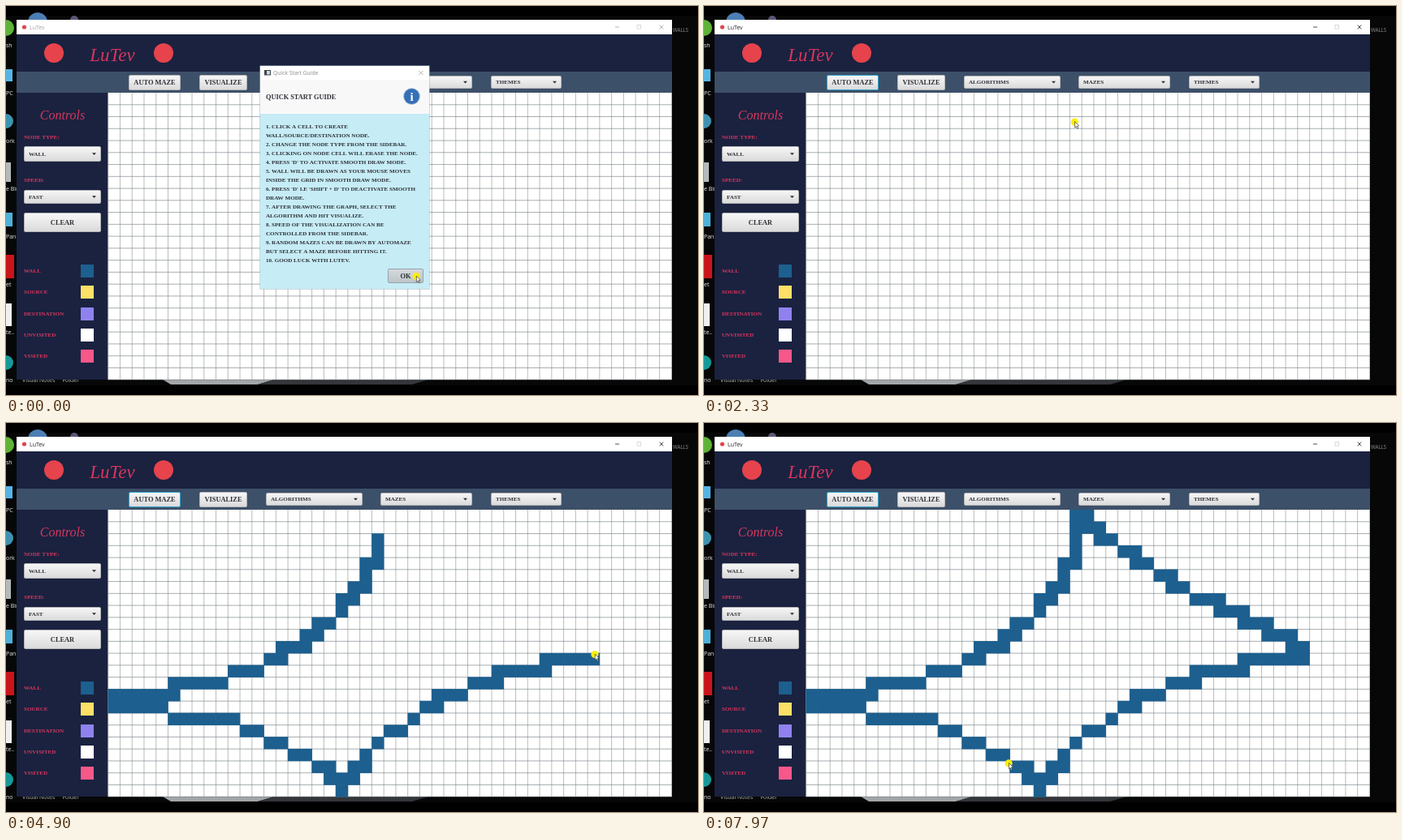
Animation, 852 px wide and 480 px high, one loop 8000 ms. Source, as an HTML page with a canvas:

```html
<!DOCTYPE html>
<html lang="en">
<head>
<meta charset="utf-8">
<title>Path finder</title>
<style>
html, body { margin: 0; width: 100%; height: 100%; overflow: hidden; background: #000; }
canvas { display: block; width: 852px; height: 480px; }
</style>
</head>
<body>
<canvas id="stage" width="852" height="480"></canvas>
<script>
const W = 852, H = 480, LOOP = 8000;
const GX = 125.7, GY = 107, CELL = 14.76, COLS = 47, ROWS = 24;
const SERIF = '"Liberation Serif", "Noto Serif", serif';
const SANS = '"Open Sans", "Noto Sans", sans-serif';
const NAVY = '#1a2240', WALL = '#1d5f8e', PINK = '#d8365c', LOGO = '#e6434c', INK = '#2e3036';

const view = document.getElementById('stage').getContext('2d');
let g = view;

function box(x, y, w, h, fill) {
  g.fillStyle = fill;
  g.fillRect(x, y, w, h);
}

function disc(x, y, r, fill) {
  g.fillStyle = fill;
  g.beginPath();
  g.arc(x, y, r, 0, Math.PI * 2);
  g.fill();
}

function shape(points, fill) {
  g.fillStyle = fill;
  g.beginPath();
  points.forEach(([x, y]) => g.lineTo(x, y));
  g.closePath();
  g.fill();
}

function line(x1, y1, x2, y2, color, width = 0.8) {
  g.strokeStyle = color;
  g.lineWidth = width;
  g.beginPath();
  g.moveTo(x1, y1);
  g.lineTo(x2, y2);
  g.stroke();
}

function text(str, x, y, font, color, align = 'left') {
  g.font = font;
  g.fillStyle = color;
  g.textAlign = align;
  g.fillText(str, x, y);
}

// Bold capitals, centred vertically on y
function caps(str, x, y, size, color = INK, align = 'left') {
  text(str, x, y + size * 0.33, `bold ${size}px ${SERIF}`, color, align);
}

function panel(x, y, w, h, border = '#b4b4b6', top = '#f8f8f8', low = '#d9d9da') {
  const grad = g.createLinearGradient(0, y, 0, y + h);
  grad.addColorStop(0, top);
  grad.addColorStop(1, low);
  g.beginPath();
  g.roundRect(x + 0.5, y + 0.5, w - 1, h - 1, 1.5);
  g.fillStyle = grad;
  g.fill();
  g.strokeStyle = border;
  g.lineWidth = 1;
  g.stroke();
}

function button(label, x, y, w, h, border) {
  panel(x, y, w, h, border);
  caps(label, x + w / 2, y + h / 2, 8.4, INK, 'center');
}

function combo(label, x, y, w, h) {
  panel(x, y, w, h);
  const cy = y + h / 2, ax = x + w - 8.5;
  caps(label, x + 6, cy, 7.1);
  shape([[ax - 2.5, cy - 1.2], [ax + 2.5, cy - 1.2], [ax, cy + 1.6]], INK);
}

function cross(x, y, r, color) {
  line(x - r, y - r, x + r, y + r, color);
  line(x - r, y + r, x + r, y - r, color);
}

function desktop() {
  box(0, 0, W, H, '#000');
  box(0, 12, W, 456, '#070708');
  disc(39, 20, 12, '#4c7fb4');
  disc(84, 17, 5, '#5a5878');
  text('WALLS', 821, 32, `6.2px ${SANS}`, '#8c8c8c');
  shape([[193, 461], [330, 461], [310, 467], [203, 467]], '#a3a6a8');
  shape([[330, 461], [520, 461], [500, 467], [310, 467]], '#34363a');
  text('Visual Notes     Folder', 20, 464, `7px ${SANS}`, '#b8b8b8');

  disc(0, 27, 10, '#5fb336');
  box(0, 78, 8, 15, '#56b4e4');
  disc(0, 142, 9, '#3f93b0');
  box(0, 193, 6, 24, '#b4b9bc');
  box(0, 255, 8, 17, '#4fb0d8');
  box(0, 307, 10, 29, '#c8141a');
  box(0, 367, 7, 28, '#f0f0f0');
  disc(0, 440, 9, '#17999a');
  ['sh', 'PC', 'ork', 'e Bin', 'Panel', 'et', 'te..', 'no'].forEach((name, i) =>
    text(name, 0, 51 + i * 59, `7px ${SANS}`, '#e8e8e8'));
}

function windowBody() {
  box(13, 17, 807, 444, NAVY);
  box(13, 81, 807, 26, '#3d5069');
  disc(59, 58, 12, LOGO);
  disc(194, 58, 12, LOGO);
  text('LuTev', 131, 68, `italic 23px ${SERIF}`, PINK, 'center');
  text('Controls', 69.5, 140, `italic 16px ${SERIF}`, PINK, 'center');

  button('VISUALIZE', 238, 85, 59, 19);
  combo('ALGORITHMS', 320, 86, 119, 16);
  combo('MAZES', 461, 86, 113, 16);
  combo('THEMES', 597, 86, 87, 16);

  caps('NODE TYPE:', 22, 161.5, 7.1, PINK);
  combo('WALL', 22, 173, 95, 19);
  caps('SPEED:', 22, 215, 7.1, PINK);
  combo('FAST', 22, 227, 95, 17);
  button('CLEAR', 22, 255, 95, 24);

  const legend = { WALL, SOURCE: '#ffe066', DESTINATION: '#8f82ee', UNVISITED: '#fff', VISITED: '#f6588a' };
  Object.entries(legend).forEach(([name, color], i) => {
    const y = Math.round(327 + i * 26.35);
    caps(name, 22, y, 7.1, PINK);
    box(92, y - 8, 16, 16, color);
  });

  box(125.5, 107, 694.5, 354, '#fff');
  for (let c = 0; c <= COLS; c++) line(GX + c * CELL, GY, GX + c * CELL, 461, '#8a9088', 0.6);
  for (let r = 1; r <= ROWS; r++) line(GX, GY + r * CELL, 820, GY + r * CELL, '#6c7880', 0.6);
}

const base = document.createElement('canvas');
base.width = W;
base.height = H;
g = base.getContext('2d');
desktop();
windowBody();
g = view;

function titleBar(active) {
  const ink = active ? '#222' : '#a4a4a4';
  box(13, 17, 807, 18, '#fff');
  disc(22.5, 26, 2.6, LOGO);
  text('LuTev', 29, 28.8, `7px ${SANS}`, ink);
  line(750, 26, 755, 26, ink);
  g.strokeStyle = '#d0d0d0';
  g.strokeRect(777, 23.5, 4.5, 4.5);
  cross(807, 26, 2.4, ink);
}

const GUIDE = `1. CLICK A CELL TO CREATE
WALL/SOURCE/DESTINATION NODE.
2. CHANGE THE NODE TYPE FROM THE SIDEBAR.
3. CLICKING ON NODE CELL WILL ERASE THE NODE.
4. PRESS 'D' TO ACTIVATE SMOOTH DRAW MODE.
5. WALL WILL BE DRAWN AS YOUR MOUSE MOVES
INSIDE THE GRID IN SMOOTH DRAW MODE.
6. PRESS 'D' I.E 'SHIFT + D' TO DEACTIVATE SMOOTH
DRAW MODE.
7. AFTER DRAWING THE GRAPH, SELECT THE
ALGORITHM AND HIT VISUALIZE.
8. SPEED OF THE VISUALIZATION CAN BE
CONTROLLED FROM THE SIDEBAR.
9. RANDOM MAZES CAN BE DRAWN BY AUTOMAZE
BUT SELECT A MAZE BEFORE HITTING IT.
10. GOOD LUCK WITH LUTEV.`.split('\n');

function dialog(fade) {
  const scale = 0.9 + 0.1 * fade;
  g.save();
  g.globalAlpha = fade;
  g.translate(417, 211);
  g.scale(scale, scale);
  g.translate(-417, -211);
  box(312.5, 73.5, 209, 276, '#9fb4bc');
  box(313, 74, 208, 17, '#fff');
  box(318, 79, 8, 6.5, '#3e464c');
  box(321, 80, 4, 4.5, '#d0d6da');
  text('Quick Start Guide', 329, 85, `6.8px ${SANS}`, '#8b8b8b');
  cross(511, 82.5, 2.6, '#a5a5a5');
  box(313, 91, 208, 42, '#f8f8f9');
  caps('QUICK START GUIDE', 320, 112, 8.3);
  disc(499.5, 111.5, 10.3, '#9db4d0');
  disc(499.5, 111.5, 9.4, '#3470b8');
  text('i', 499.5, 117, `bold 15px ${SERIF}`, '#fff', 'center');
  box(313, 133, 208, 216, '#c6ecf6');
  GUIDE.forEach((row, i) => caps(row, 320, 148.3 + i * 11, 7.1));
  panel(470, 324, 44, 18, '#94a4ac', '#d6dade', '#bcc4c8');
  caps('OK', 492, 333.5, 8.4, INK, 'center');
  g.restore();
}

// Pointer moves in cell units: start, end, bend, target
const moves = [
  [670, 1470, [23.5, 6], [20.55, 0.8]],
  [1500, 2070, [21.5, 1.4], [22.4, 2.45]],
  [2670, 3170, [22.4, 3.6], [22.1, 4.7]],
  [3170, 3900, [17.9, 13.8], [0.4, 15.85]],
  [3900, 3970, [0.4, 16.4], [1.04, 16.65]],
  [3970, 4390, [15.2, 17.5], [19.5, 23.5]],
  [4390, 4900, [23.9, 15.1], [40.6, 12.1]],
  [4900, 5150, [41.8, 12.8], [41.3, 11.4]],
  [5150, 5800, [30, 6.45], [22.65, 0.5]],
  [6900, 7700, [22, 8], [12.7, 13.9]],
  [7700, 7970, [13.5, 17.5], [16.9, 21.2]]
];

function pointer(t) {
  let at = [25.7, 15.35];
  for (const [from, to, bend, end] of moves) {
    if (t <= from) break;
    const k = Math.min(1, (t - from) / (to - from)), s = k * k * (3 - 2 * k);
    at = at.map((p, i) => (1 - s) ** 2 * p + 2 * s * (1 - s) * bend[i] + s * s * end[i]);
  }
  return at;
}

// Smooth draw mode: every cell the pointer crosses becomes a wall
const walls = new Map();
function drawWalls(from, to) {
  for (let t = from; t <= to; t += 12) {
    const key = pointer(t).map(Math.floor).join();
    if (!walls.has(key)) walls.set(key, t);
  }
}
drawWalls(2680, 5800);
drawWalls(6900, 7080);

function cursor(t) {
  const [c, r] = pointer(t), x = GX + c * CELL, y = GY + r * CELL;
  disc(x, y, 4.6, '#fbee10');
  g.save();
  g.translate(x + 0.3, y - 0.5);
  shape([[0, 0], [0, 7.5], [1.7, 6], [3, 8.8], [4.1, 8.2], [2.9, 5.6], [5, 5.3]], '#fff');
  g.strokeStyle = '#38383c';
  g.lineWidth = 0.7;
  g.stroke();
  g.restore();
}

function draw(t) {
  const active = t >= 100;
  g.drawImage(base, 0, 0);
  titleBar(active);
  button('AUTO MAZE', 151, 85, 64, 19, active ? '#2fa4cc' : undefined);
  for (const [key, at] of walls) {
    const [c, r] = key.split(',');
    if (t >= at) box(GX + c * CELL - 0.3, GY + r * CELL - 0.3, CELL + 0.6, CELL + 0.6, WALL);
  }
  const fade = 1 - Math.max(0, (t - 40) / 200);
  if (fade > 0) dialog(Math.min(1, fade));
  cursor(t);
}

const start = performance.now();
function frame() {
  draw((performance.now() - start) % LOOP);
  requestAnimationFrame(frame);
}
frame();
</script>
</body>
</html>
```
